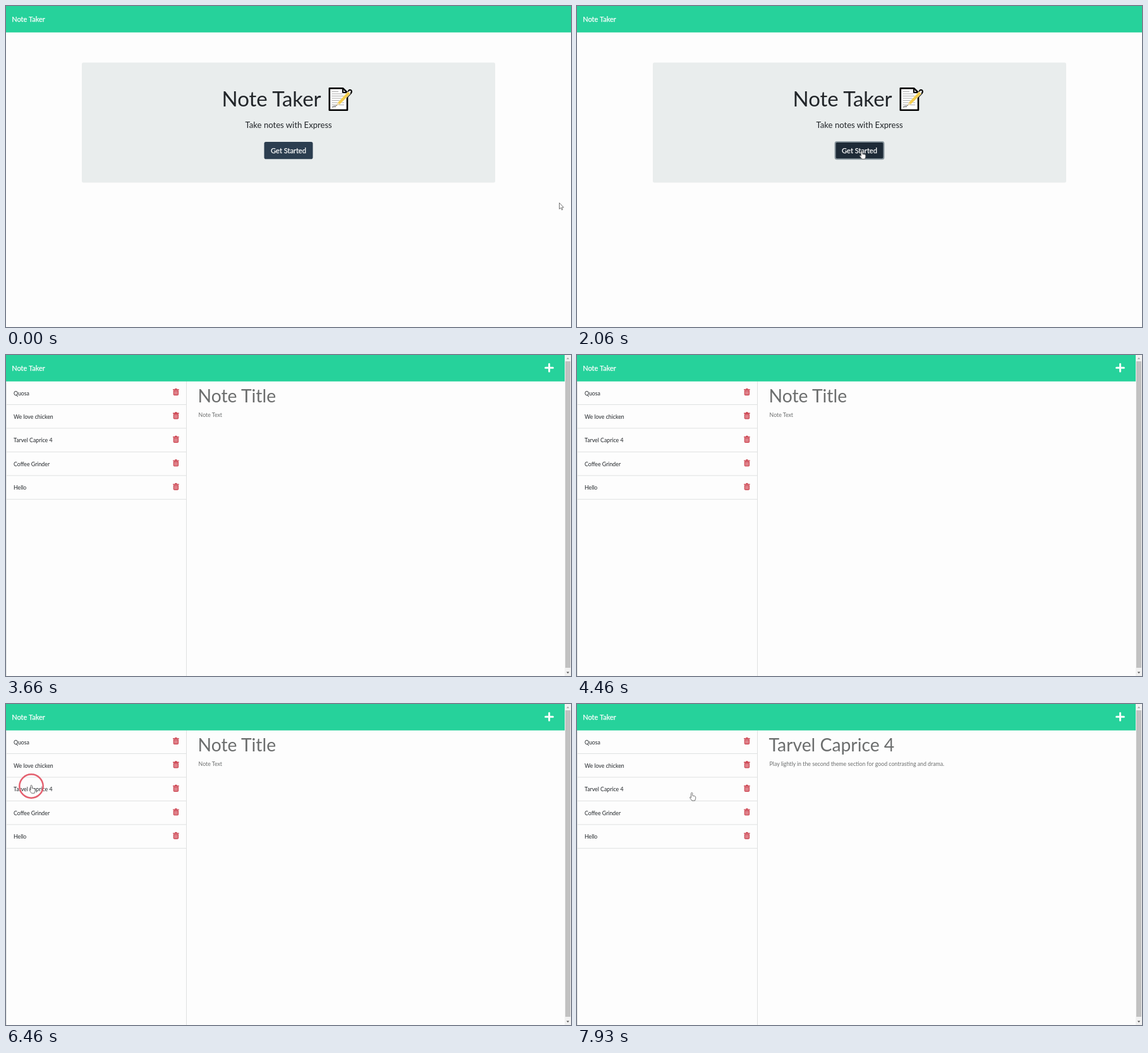
Write an HTML page that moves like this. It is 894 px wide and 508 px high and loops after 8000 ms.

```html
<!DOCTYPE html>
<html lang="en">
<head>
<meta charset="utf-8">
<title>Note Taker</title>
<style>
  html, body { margin: 0; width: 100%; height: 100%; overflow: hidden; background: #fdfdfd; }
  svg { display: block; width: 894px; height: 508px; }
  text { font-family: Lato, sans-serif; font-size: 8.78px; fill: #212529; white-space: pre; }
  .brand { font-size: 11.05px; fill: #fff; stroke: #fff; stroke-width: .25; }
  .heading { font-size: 33px; }
  .lead { font-size: 13.1px; }
  .line { stroke: #dfe1e1; fill: none; }
  .form { fill: #6c6e6e; }
  #title { font-size: 28.3px; }
  #cursor path { fill: #fff; stroke: #666; stroke-width: .9; stroke-linejoin: round; }
</style>
</head>
<body>
<svg viewBox="0 0 894 508">
  <defs>
    <g id="trash">
      <path d="M0 1.2H3L3.6 0H6L6.6 1.2H9.6V2.6H0Z" fill="#cb3f4c"/>
      <path d="M1.1 3.4H8.500V9.600Q8.500 10.600 7.500 10.600H2.100Q1.100 10.600 1.100 9.600Z" fill="#d96a74" stroke="#cb3f4c"/>
      <path d="M2.900 4.500V9.500M4.800 4.500V9.500M6.700 4.500V9.500" stroke="#e9a9af" stroke-width=".7"/>
    </g>
  </defs>
  <rect width="894" height="508" fill="#fdfdfd"/>
  <rect width="894" height="41.8" fill="#26d29b"/>
  <text class="brand" x="9.2" y="24.5">Note Taker</text>

  <g id="home">
    <rect x="120" y="89.5" width="654" height="190" rx="2.5" fill="#e9eded"/>
    <text class="heading" x="341.500" y="159">Note Taker</text>
    <g stroke-linejoin="round">
      <path d="M511.800 130.200H533L540 137V164.800H511.800Z" fill="#fff" stroke="#000" stroke-width="2.600"/>
      <path d="M515.500 135.500H526M515.500 139H532M515.500 142.500H535M515.500 146H535M515.500 149.500H535M515.500 153H535M515.500 156.500H535M515.500 160H522"
            stroke="#aaa" stroke-width="1.100"/>
      <path d="M533 130V137H540L543 133Q545.500 132 546.600 134Q547.600 136.500 545 139L540 144"
            fill="#e8e8e8" stroke="#000" stroke-width="2"/>
      <path d="M522.500 158L525 152.500L541 135.500L545 138.800L528.500 155.500Z" fill="#f3cd4f" stroke="#fff" stroke-width=".600"/>
      <path d="M522 158.500L525 152.500L528.500 155.500Z" fill="#efdcb4"/>
      <path d="M516 160Q519 158 522 158.500L523.500 156.500" fill="none" stroke="#444" stroke-width=".800"/>
    </g>
    <text class="lead" x="447.200" y="193" text-anchor="middle">Take notes with Express</text>
    <rect id="button" x="408.500" y="215" width="77" height="27.200" rx="2.800"/>
    <text class="brand" x="447" y="232.700" text-anchor="middle">Get Started</text>
  </g>

  <g id="notes">
    <path class="line" d="M.5 42V508M285.500 42V508"/>
    <path d="M859.500 14.300V26.100M853.600 20.200H865.400" stroke="#f4fffb" stroke-width="3" stroke-linecap="round"/>
    <g id="list"></g>
    <text id="title" class="form" x="303.600" y="74.700"></text>
    <text id="body" class="form" x="304.600" y="97.800"></text>
    <rect x="884" width="10" height="508" fill="#f1f1f1"/>
    <rect x="885" y="10" width="8" height="485" fill="#c1c1c1"/>
    <path d="M886.800 6.500L889 4L891.200 6.500Z" fill="#a3a3a3"/>
    <path d="M886.800 501.500L889 504L891.200 501.500Z" fill="#505050"/>
  </g>

  <circle id="ring" r="18.700" fill="none" stroke="#e4606f" stroke-width="2.500"/>
  <g id="cursor">
    <path id="arrow" d="M0 0V9.800L2.300 7.800L3.900 11.300L5.400 10.600L3.900 7.300H6.900Z"/>
    <path id="hand" d="M-1.200 8V1.200A1.100 1.100 0 0 1 1.100 1.200V4.800L4.800 5.500Q6 5.900 6 7.200V9.200L4.800 12.700H.3L-3 8.400Q-3.600 7 -2.400 6.900Z"/>
  </g>
</svg>
<script>
const $ = id => document.getElementById(id);
const show = (id, on) => $(id).style.display = on ? "" : "none";
const LOOP = 8000, STEP = 1000 / 15;
const PAGE = 2600, LOADED = 2800, OPENED = 6600;
const PIECE = "Tarvel Caprice 4";

$("list").innerHTML = ["Quosa", "We love chicken", PIECE, "Coffee Grinder", "Hello"].map((name, i) => {
  const y = i * 37.45;
  return `<text x="12" y="${63.5 + y}">${name}</text>
    <use href="#trash" x="264.100" y="${52.9 + y}"/>
    <path class="line" d="M0 ${78.5 + y}H285"/>`;
}).join("");

// Cursor moves: start, end, target x, target y
const moves = [
  [0, 1000, 450.7, 229.5],
  [4066, 5066, 33.2, 64.3],
  [5200, 5466, 37, 103],
  [5866, 6200, 40.2, 128.5],
  [7400, 7933, 181.7, 140.3]
];
const clicks = [[1730, 2060], [6460, 6730]];

const clamp = v => Math.max(0, Math.min(1, v));
const ease = v => v * v * (3 - 2 * v);

function cursorAt(t) {
  let x = 875.5, y = 311.5;
  for (const [start, end, toX, toY] of moves) {
    const k = ease(clamp((t - start) / (end - start)));
    x += (toX - x) * k;
    y += (toY - y) * k;
  }
  return [x, y];
}

function draw(time) {
  const t = Math.floor((time + 7) / STEP) * STEP;
  const [x, y] = cursorAt(t);
  const home = t < PAGE - 1;
  const loaded = t >= LOADED - 1;
  const open = t >= OPENED - 1;
  const hover = x > 408 && x < 486 && y > 215 && y < 242;

  show("home", home);
  show("notes", !home);
  show("list", loaded);
  $("title").textContent = open ? PIECE : "Note Title";
  $("body").textContent = open
    ? "Play lightly in the second theme section for good contrasting and drama." : "Note Text";

  const button = $("button");
  button.setAttribute("fill", hover ? "#1e2b37" : "#2c3e50");
  button.setAttribute("stroke", t >= clicks[0][0] ? "#8b989f" : "none");
  button.setAttribute("stroke-width", 2);

  // The pointer is not visible above the text fields
  show("cursor", !loaded || x < 285);
  show("arrow", home && !hover);
  show("hand", !home || hover);
  $("cursor").setAttribute("transform", `translate(${x} ${y})`);

  const click = clicks.find(([start, end]) => t >= start && t < end - 1);
  show("ring", click);
  if (click) {
    $("ring").setAttribute("cx", x - .2);
    $("ring").setAttribute("cy", y + 1.5);
    $("ring").setAttribute("opacity", clamp((click[1] + 60 - t) / 200));
  }
}

const begin = performance.now();
function tick() {
  draw((performance.now() - begin) % LOOP);
  requestAnimationFrame(tick);
}
tick();
</script>
</body>
</html>
```
